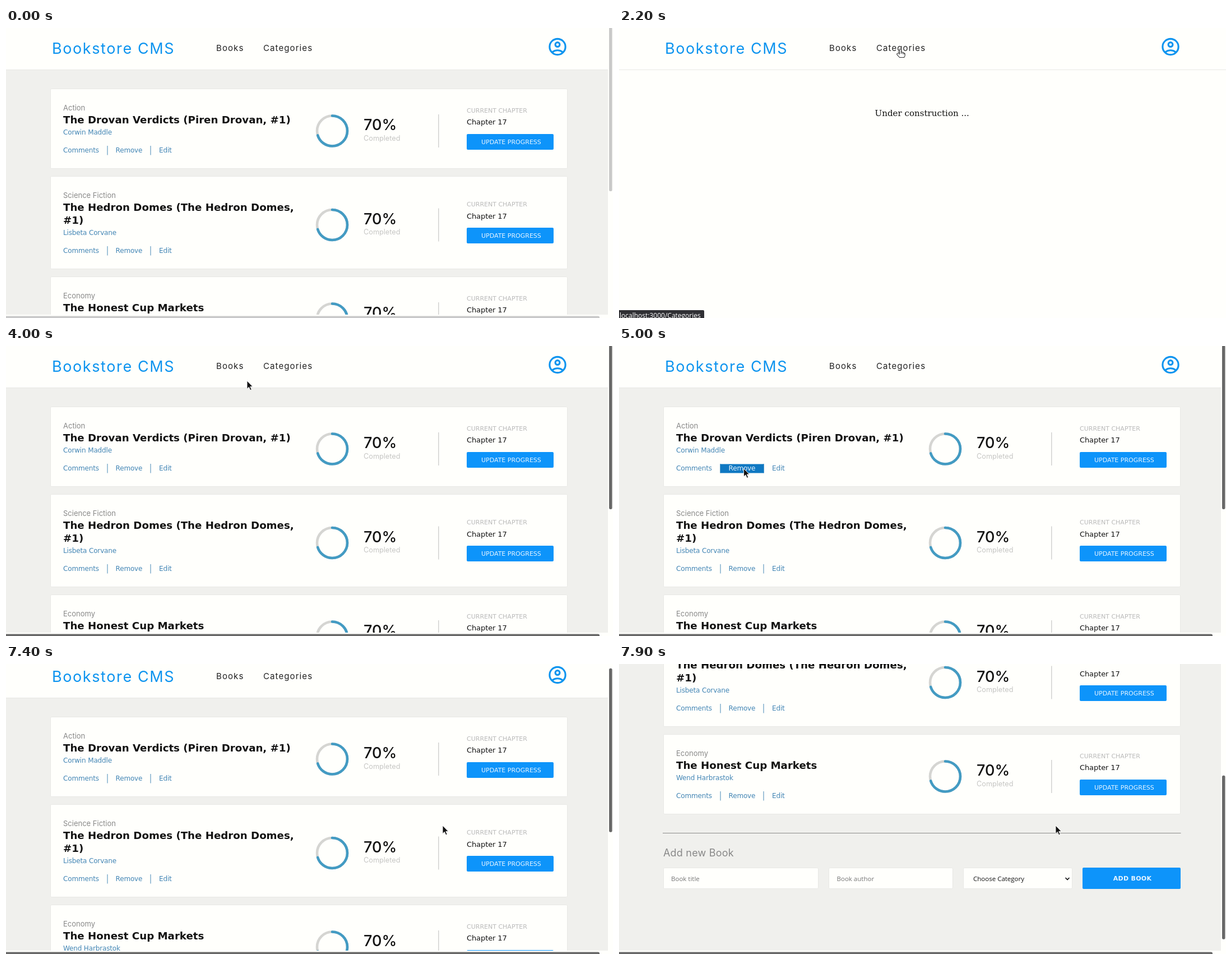
These frames come from a looping animation (1083x517 px, 8000 ms). An HTML page:

```html
<!DOCTYPE html>
<html lang="en">
<head>
<meta charset="utf-8">
<title>Bookstore CMS</title>
<style>
html, body { margin: 0; width: 100%; height: 100%; overflow: hidden; background: #fffffc; }
svg { display: block; width: 1083px; height: 517px; }
text { white-space: pre; fill: #121212; font-family: "DejaVu Sans", sans-serif; }
.brand, .nav, .cat, .pct, .done, .add { font-family: Inter, sans-serif; }
.brand { font-size: 27px; letter-spacing: 1.6px; fill: #0d94ef; }
.nav { font-size: 15px; letter-spacing: 1.1px; fill: #222; }
.cat { font-size: 13px; fill: #888; }
.title { font-size: 18.2px; font-weight: bold; }
.link { font-size: 12px; letter-spacing: -.15px; fill: #4386b5; }
.pct { font-size: 27px; font-weight: 500; }
.done { font-size: 12.7px; fill: #c6c6c4; }
.cap { font-size: 11px; fill: #bababa; }
.chap { font-size: 13px; letter-spacing: -.1px; }
.btn { font-size: 11px; fill: #e8f5ff; }
.add { font-size: 18px; letter-spacing: .2px; fill: #888; }
.field { font: 11.5px "Open Sans", sans-serif; fill: #757575; }
.pick { fill: #111; }
.bold { font-weight: bold; letter-spacing: .3px; }
.wip { font: 15.1px "DejaVu Serif", serif; fill: #111; }
.tip { font: 12px "Open Sans", sans-serif; fill: #fff; }
.blue { fill: #0d94fa; }
.panel { fill: #fffffc; stroke: #e8e8e5; }
.line { fill: none; stroke: #4386b5; }
</style>
</head>
<body>
<svg id="stage" viewBox="0 0 1083 517"></svg>
<script>
const LOOP = 8000, STEP = 100;
const WIP_START = 1600, WIP_END = 3300, FOCUS = 1200;

// time, x, y of the pointer tip
const PATH = [
  [300, 1073, 353], [500, 940, 262], [800, 640, 112], [1100, 511, 46],
  [1200, 512, 38], [2100, 512, 38], [2400, 482, 38], [2700, 420, 38],
  [2900, 408, 38], [3900, 408, 38], [4000, 430, 62], [4200, 497, 112],
  [4300, 481, 141], [4400, 481, 141], [4600, 400, 215], [4800, 270, 257],
  [5000, 222.5, 218.5], [5200, 222.5, 218.5], [5500, 280, 219.5],
  [5600, 280, 219.5], [5700, 284, 219.5], [6300, 145, 219.5],
  [6500, 145, 219.5], [6600, 161, 219], [6900, 624, 273],
  [7000, 624, 273], [7100, 735, 283], [7200, 779, 288]
];
const SCROLL = [[7300, 0], [7400, 14], [7600, 149], [7800, 274], [7900, 318]];

const BOOKS = [
  { y: 108, h: 143, cat: 'Action', title: ['The Drovan Verdicts (Piren Drovan, #1)'], author: 'Corwin Maddle' },
  { y: 264, h: 166, cat: 'Science Fiction', title: ['The Hedron Domes (The Hedron Domes,', '#1)'], author: 'Lisbeta Corvane' },
  { y: 443, h: 143, cat: 'Economy', title: ['The Honest Cup Markets'], author: 'Wend Harbrastok' }
];

const text = (x, y, cls, s, more = '') => `<text x="${x}" y="${y}" class="${cls}" ${more}>${s}</text>`;
const rect = (x, y, w, h, more) => `<rect x="${x}" y="${y}" width="${w}" height="${h}" ${more}/>`;
const panel = (x, y, w, h) => rect(x + .5, y + .5, w - 1, h - 1, 'rx="2" class="panel"');

const header = width => rect(0, 0, width, 74, 'fill="#fffffc"') +
  rect(0, 74, width, 1, 'fill="#e8e8e5"') +
  text(82, 46, 'brand', 'Bookstore CMS') +
  text(375, 41, 'nav', 'Books') + text(459, 41, 'nav', 'Categories') +
  `<g fill="none" stroke="#0d94ef" stroke-width="2" transform="translate(984 33.5) scale(1.57)">
    <circle r="9"/><circle cy="-2.5" r="2.5"/><path d="M-5.9 6Q-3.2 4 0 4T5.9 6"/></g>`;

function progress(y) {
  const r = 27, len = 2 * Math.PI * r, top = Math.round(y + 5.4);
  const ring = `cx="582" cy="${y}" r="${r}" fill="none" stroke-width="4.6"`;
  return `<circle ${ring} stroke="#d5d5d2"/>
    <circle ${ring} stroke="#439bc3" stroke-linecap="round" stroke-dasharray="${len * .7} ${len}" transform="rotate(-90 582 ${y})"/>` +
    text(638, y - 1.5, 'pct', '70%') + text(638, y + 17, 'done', 'Completed') +
    rect(771, y - 29.5, 1.5, 59, 'fill="#d2d2d0"') +
    text(822, y - 33, 'cap', 'CURRENT CHAPTER') + text(822, y - 11.5, 'chap', 'Chapter 17') +
    rect(822, top, 155, 28, 'rx="2" class="blue"') +
    text(848, top + 18, 'btn', 'UPDATE PROGRESS');
}

function card({ y, h, cat, title, author }, i) {
  const base = y + h - 29;
  return panel(79, y, 923, h) + text(102, y + 39, 'cat', cat) +
    title.map((s, n) => text(102, y + 62 + n * 22.5, 'title', s)).join('') +
    text(102, base - 32.5, 'link', author) +
    text(102, base, 'link', 'Comments') +
    text(195.5, base, 'link', 'Remove') +
    text(273, base, 'link', 'Edit') +
    `<path class="line" d="M181 ${base - 12}v16.5M258 ${base - 12}v16.5"/>` +
    progress(183.5 + i * 167.5);
}

const form = rect(78, 619, 924.5, 1, 'fill="#8c8c8a"') +
  text(79, 661, 'add', 'Add new Book') +
  panel(79, 681, 277, 38) + text(93, 705, 'field', 'Book title') +
  panel(374, 681, 222, 38) + text(388.5, 705, 'field', 'Book author') +
  panel(614, 681, 195, 38) + text(632, 705, 'field pick', 'Choose Category') +
  '<path d="M796.5 699l3.5 3.5l3.5 -3.5" fill="none" stroke="#111" stroke-width="1.7"/>' +
  rect(827, 681, 175, 38, 'rx="2" class="blue"') +
  text(916, 703.5, 'btn bold', 'ADD BOOK', 'text-anchor="middle"');

document.getElementById('stage').innerHTML = `
  <g id="books">
    ${rect(0, 0, 1074, 511, 'fill="#f0f0ed"')}
    <g id="page">${header(1074)}${BOOKS.map(card).join('')}${form}
      <g id="hover">${rect(180.5, 210.5, 78, 16, 'fill="#0f78c2"')}
        ${text(195.5, 222, 'link', 'Remove', 'style="fill:#e6f3fc"')}</g>
    </g>
    ${rect(1074, 0, 9, 517, 'fill="#fffffc"')}${rect(0, 511, 1083, 6, 'fill="#fffffc"')}
    <g id="bars">${rect(1076, -1, 5.5, 292, 'rx="2.5" id="thumb"')}${rect(-3, 513.5, 1062, 5.5, 'rx="2.5"')}</g>
  </g>
  <g id="wip">${rect(0, 0, 1083, 517, 'fill="#fffffc"')}${header(1083)}
    ${text(456.5, 157, 'wip', 'Under construction ...')}</g>
  <g id="status">${rect(-3, 503, 10, 17, 'rx="2" fill="#303034" id="bubble"')}
    ${text(1, 516.5, 'tip', '', 'id="url"')}</g>
  <g id="pointer">
    <path id="arrow" d="M0 0V14.5L3.4 11.3L5.8 16.8L8.2 15.7L5.8 10.4H10.2Z" fill="#111" stroke="#fff" stroke-width=".9"/>
    <path id="hand" d="M-1.5 8.5V1Q-1.5 -.7 0 -.7T1.5 1V5Q4 4.3 4.3 6Q6.3 5.3 6.6 7Q8.2 6.7 8.2 8.2V11Q8 13 6.5 14.5H-1.5L-6 9.4Q-6.8 7.6 -5 7.2Q-3.8 7 -1.5 8.5ZM1.5 5V8M4.3 6V8.5M6.6 7V9" fill="#fff" stroke="#333" stroke-width="1.1" stroke-linejoin="round"/>
  </g>`;

const el = id => document.getElementById(id);
const show = (id, on) => el(id).setAttribute('display', on ? 'inline' : 'none');
const move = (id, x, y) => el(id).setAttribute('transform', `translate(${x} ${y})`);

// Piecewise linear value of timed points
function at(points, t) {
  const n = points.findIndex(p => p[0] > t);
  if (n === 0) return points[0].slice(1);
  if (n < 0) return points[points.length - 1].slice(1);
  const a = points[n - 1], b = points[n], k = (t - a[0]) / (b[0] - a[0]);
  return a.slice(1).map((v, i) => v + (b[i + 1] - v) * k);
}

function draw() {
  const t = Math.floor(performance.now() % LOOP / STEP) * STEP;
  const [x, y] = at(PATH, t), [scroll] = at(SCROLL, t);
  const wip = t >= WIP_START && t < WIP_END;
  const onNav = t >= FOCUS && t < 4000 && y < 46;
  const onCategories = onNav && x > 459, onBooks = onNav && x < 425;
  const onLink = onCategories || onBooks;

  show('books', !wip);
  show('wip', wip);
  move('page', 0, -scroll);
  move('thumb', 0, scroll * .628);
  el('bars').setAttribute('fill', t < FOCUS ? '#c9c9c9' : '#686868');
  show('hover', t >= 4400 && x > 181 && x < 258 && y > 210 && y < 227);

  show('status', onLink && (wip || onCategories));
  el('url').textContent = 'localhost:3000' + (onCategories ? '/Categories' : '');
  el('bubble').setAttribute('width', onCategories ? 155 : 89.5);

  show('pointer', t >= 300);
  move('pointer', x, y);
  show('arrow', !onLink);
  show('hand', onLink);
  requestAnimationFrame(draw);
}
draw();
</script>
</body>
</html>
```
